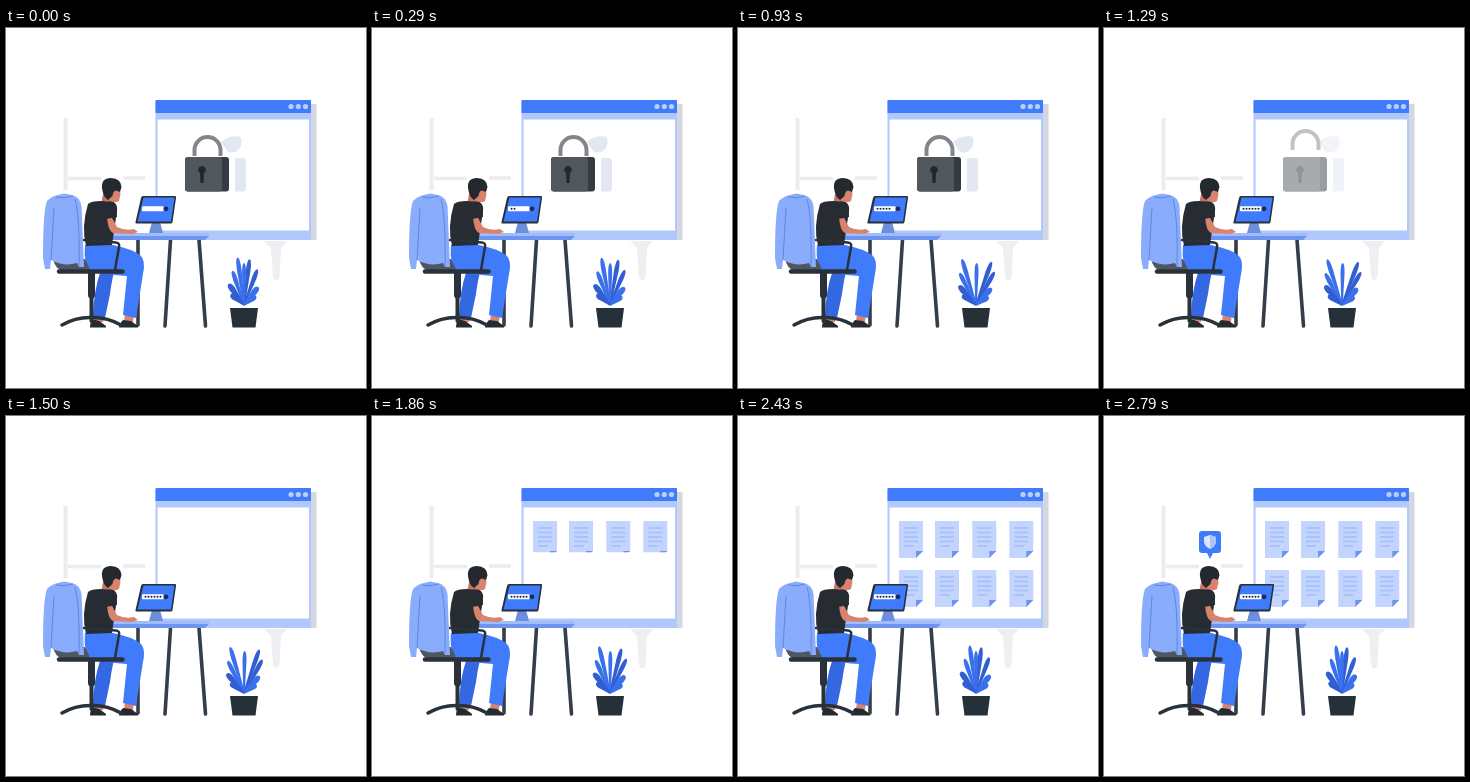
These frames come from a looping animation (360x360 px, 2870 ms). An HTML page:

```html
<!DOCTYPE html>
<html lang="en">
<head>
<meta charset="utf-8">
<title>Unlocking files with a password</title>
<style>
  html, body { margin: 0; width: 100%; height: 100%; overflow: hidden; background: #fff; }
  svg { display: block; width: 100vw; height: 100vh; }
</style>
</head>
<body>
<svg viewBox="0 0 360 360">
  <defs>
    <g id="sheet">
      <path d="M0 0H24V30L17 37H0Z" fill="#c3d5fe"/>
      <path d="M24 30L17 37V30Z" fill="#6d94ee"/>
      <path d="M5 7H19M5 11.500H19M5 16H19M5 20.500H19M5 25H15" stroke="#a3bffa" stroke-width="1.700"/>
    </g>
    <clipPath id="clip0"><rect x="150" y="105" width="155" height="0"/></clipPath>
    <clipPath id="clip1"><rect x="150" y="154" width="155" height="0"/></clipPath>
  </defs>

  <!-- wall -->
  <g fill="none" stroke="#ececef" stroke-width="4">
    <path d="M59.500 90V162"/>
    <path d="M62 150.500H95M117 150H139" stroke-width="3.500"/>
  </g>
  <path d="M258 213H281L275 220L273.500 249Q270 256 267 249L265 220Z" fill="#eeeff3"/>

  <!-- browser window -->
  <path d="M303 76H310.500V212H303Z" fill="#d4d7df"/>
  <rect x="149.500" y="72" width="155.500" height="140" rx="1" fill="#b1c8fe"/>
  <rect x="151.500" y="91.500" width="151.500" height="111" fill="#fff"/>
  <path d="M149.500 85V73Q149.500 72 151 72H304Q305 72 305 73V85Z" fill="#407bfc"/>
  <g fill="#b9cffd">
    <circle cx="285" cy="78.500" r="2.600"/><circle cx="292.300" cy="78.500" r="2.600"/><circle cx="299.500" cy="78.500" r="2.600"/>
  </g>
  <g id="docs"></g>

  <!-- padlock -->
  <g id="lock">
    <path d="M215 114Q222 107 234 108.500Q238 114 233 121Q229 126 222 124ZM229 130H237Q240 130 240 134V160Q240 163.500 237 163.500H229Z" fill="#e2e7f2"/>
    <path id="shackle" d="M188.500 128V122A13 13 0 0 1 214.500 122V128" fill="none" stroke="#858589" stroke-width="4"/>
    <rect x="179" y="129" width="44" height="34.500" rx="3" fill="#343b41"/>
    <rect x="179" y="129" width="37" height="34.500" rx="3" fill="#50575d"/>
    <path d="M196 138A3.800 3.800 0 0 1 198 145L197.500 155H194.500L194 145A3.800 3.800 0 0 1 196 138Z" fill="#22282d"/>
  </g>

  <!-- shield bubble -->
  <g id="bubble">
    <path d="M98 115H114Q117 115 117 118V134Q117 137 114 137H109L106 143L103 137H98Q95 137 95 134V118Q95 115 98 115Z" fill="#407bfc"/>
    <path d="M106 119L112 121V126Q111 131 106 133Q101 131 100 126V121Z" fill="#dce7fe"/>
    <path d="M106 119L112 121V126Q111 131 106 133Z" fill="#a9c4fc"/>
  </g>

  <!-- plant -->
  <g id="leaves"></g>
  <path d="M224 280H252L249.500 299.500H226.500Z" fill="#263038"/>

  <!-- desk -->
  <g stroke="#343d4a" stroke-width="3.600" stroke-linecap="round">
    <path d="M132 212V297"/><path d="M164.500 212L159 298"/><path d="M193 212L199.500 298"/>
  </g>
  <path d="M85 205H203V208L199 212H85Z" fill="#6e94f0"/>
  <path d="M85 205H203V208H85Z" fill="#9fbcfb"/>

  <!-- computer -->
  <path d="M146 194H154L157 205H143Z" fill="#6d8edb"/>
  <path d="M137 168H169Q170.500 168 170 170L166.500 194Q166 195.500 165 195.500H130.500Q129 195.500 129.500 194L135 170Q135.500 168 137 168Z" fill="#26303c"/>
  <path d="M137.500 169.500H168.500L165 193.500H131.500Z" fill="#407bfc"/>
  <rect x="136" y="178.300" width="21.500" height="5" rx="1" fill="#fff"/>
  <circle cx="160" cy="180.800" r="2.400" fill="#1d2c57"/>
  <g id="dots" fill="#20262f"></g>

  <!-- legs and shoes -->
  <path d="M91 284L98 286L97 294H88ZM119 285H128L127 294H118Z" fill="#d9836f"/>
  <path d="M87 291L94 293.500L100 298V299.500H84Q84 294 87 291ZM117 292L125 293L132 298V299.500H113Q113 296 117 292Z" fill="#232b31"/>
  <path d="M88 237H110Q106 250 104 266L99 290L87 288Q88 262 94 245Z" fill="#3467e2"/>
  <path d="M79 217H107Q126 221 134 227Q140 232 137 246L130 290L117 287L121 248Q102 247 87 243Q77 239 79 217Z" fill="#407bfc"/>

  <!-- torso and head -->
  <path d="M97 166H109L108 177H95Z" fill="#c97565"/>
  <path d="M104 160H113.500L114.500 166L113 173Q108 176 103 172Z" fill="#d9836f"/>
  <path d="M96 160Q95 150 105 150Q115 150.500 115.500 159L114 164L110 162.500Q107 163 106.500 168L102 172Q97 169 96 160Z" fill="#23292f"/>
  <path d="M82 176Q85 173 95 173L107 174Q112 176 111 183L108 203L106 217L80 218Q75 199 82 176Z" fill="#262c31"/>
  <path d="M105 188L111 199Q119 203 128 201L132 204L126 206L107 205Q102 203 101 189Z" fill="#d9836f"/>
  <path d="M97 179Q100 172 107 174Q111 177 111 189L100 191Z" fill="#262c31"/>

  <!-- chair and jacket -->
  <path d="M47 231H79L85 243H56Q49 240 47 231Z" fill="#50565f"/>
  <g fill="none" stroke="#29323a" stroke-linecap="round">
    <path d="M53 243.500H116.500" stroke-width="4.500"/>
    <path d="M78 212L110 214.500Q114 215 113 219L109 242" stroke-width="2.500"/>
    <path d="M85.500 246V267" stroke-width="7"/>
    <path d="M85.500 267V293" stroke-width="4"/>
    <path d="M56 297Q70 289 85.500 289.500Q101 289 115 297" stroke-width="3.500"/>
  </g>
  <path d="M41 173Q46 168 52 167L58 165.500L66 167Q74 169 75.500 178L78 239L73 239L71 235Q58 239 45 232L44 241H39L37 230Q37 183 41 173Z" fill="#8aacfd"/>
  <path d="M48 180L45 232M69 171Q74 190 73 238M50 169Q58 171 67 168" fill="none" stroke="#5f86e4" stroke-width="1"/>
</svg>
<script>
const LOOP = 2870;
const $ = id => document.getElementById(id);
const clamp = x => Math.min(1, Math.max(0, x));
const ramp = (t, from, to) => clamp((t - from) / (to - from));
const ease = x => x * x * (3 - 2 * x);

const columns = [161, 197, 234.300, 271.300];
$('docs').innerHTML = [105, 154].map((y, row) =>
  `<g clip-path="url(#clip${row})">` +
  columns.map(x => `<use href="#sheet" x="${x}" y="${y}"/>`).join('') + '</g>').join('');
const reveals = [0, 1].map(i => document.querySelector(`#clip${i} rect`));

const keyTimes = [120, 240, 360, 500, 700, 950];
$('dots').innerHTML = keyTimes.map((_, i) =>
  `<circle cx="${139.500 + i * 3}" cy="180.800" r="1"/>`).join('');
const dots = [...$('dots').children];

// angle from upright, length, half width, extra angle when spread
const leafSpecs = [
  [-7, 48, 2.300, -11], [6, 46, 2.300, 15], [0, 42, 2, 1],
  [20, 38, 2.300, 10], [-18, 36, 2.300, -10],
  [-36, 26, 3, -6], [38, 23, 3, 5], [-50, 17, 3, -4], [52, 15, 3, 4]
];
const leafPath = (len, w) =>
  `M-.8 0L${-w} ${-len * .75}Q${-w} ${-len} 0 ${-len}Q${w} ${-len} ${w} ${-len * .75}L.8 0Z`;
$('leaves').innerHTML = leafSpecs.map(([, len, w], i) =>
  `<path fill="${i % 2 ? '#315fd2' : '#3b70ec'}" d="${leafPath(len, w)}"/>`).join('');
const leaves = [...$('leaves').children];

function draw(t) {
  dots.forEach((dot, i) => dot.setAttribute('visibility', t >= keyTimes[i] ? 'visible' : 'hidden'));

  $('shackle').setAttribute('transform', `translate(0 ${-6 * ease(ramp(t, 1000, 1140))})`);
  $('lock').setAttribute('opacity', 1 - ease(ramp(t, 1180, 1400)));

  reveals.forEach((rect, i) =>
    rect.setAttribute('height', 37 * ease(ramp(t, 1590 + i * 450, 1950 + i * 450))));

  const pop = ease(ramp(t, 2430, 2650));
  $('bubble').setAttribute('transform', `translate(106 143) scale(${pop}) translate(-106 -143)`);

  const spread = (1 + Math.cos(2 * Math.PI * (t - 1200) / LOOP)) / 2;
  leaves.forEach((leaf, i) => {
    const [angle, , , swing] = leafSpecs[i];
    leaf.setAttribute('transform', `translate(238 277) rotate(${angle + swing * spread})`);
  });
}

const start = performance.now();
function tick() {
  draw((performance.now() - start) % LOOP);
  requestAnimationFrame(tick);
}
tick();
</script>
</body>
</html>
```
